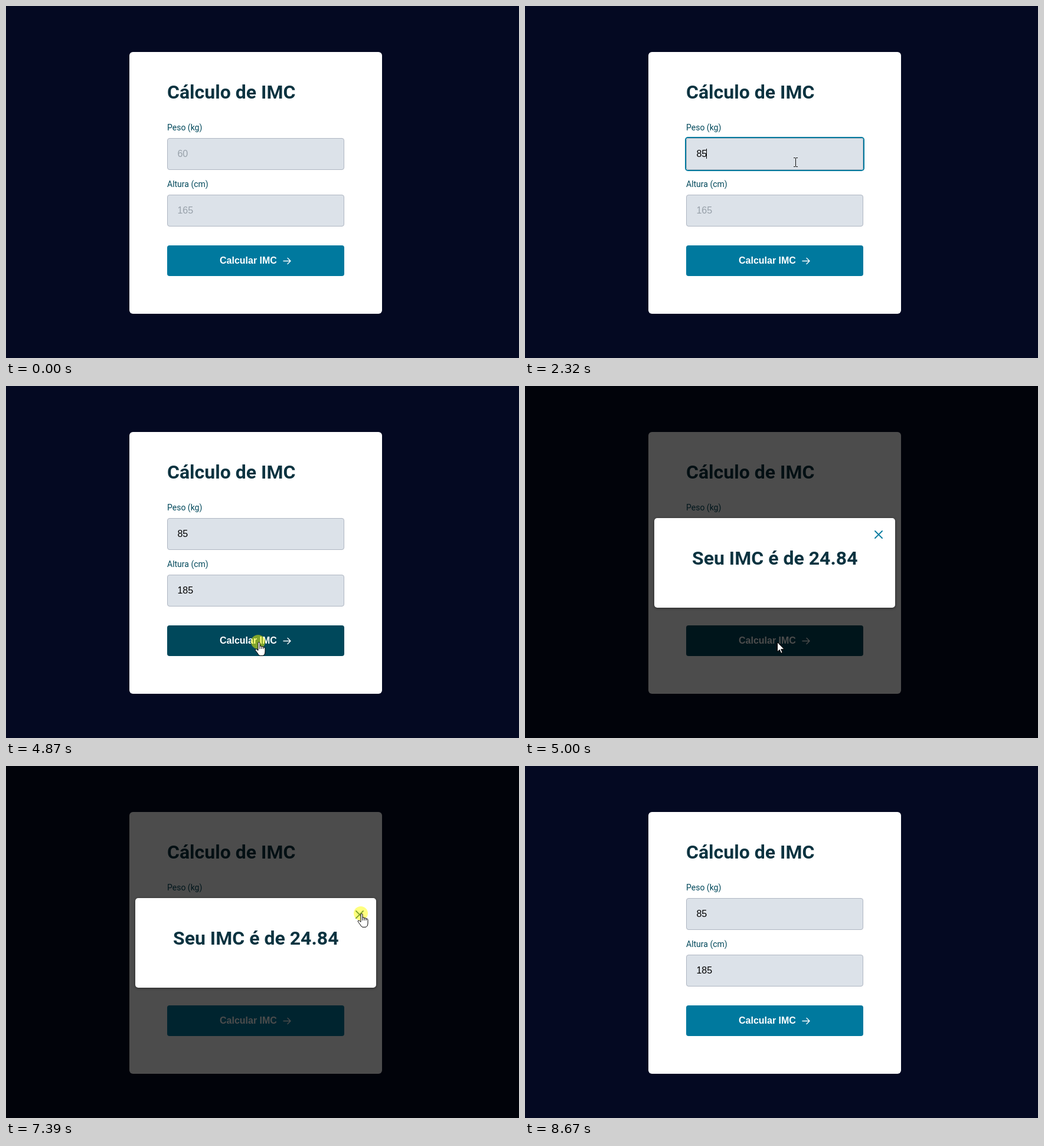
An HTML page that plays this animation: 869 by 597 pixels, repeating every 9 s.

```html
<!DOCTYPE html>
<html lang="pt-BR">
<head>
<meta charset="utf-8">
<title>Cálculo de IMC</title>
<style>
  html, body { margin: 0; height: 100%; overflow: hidden; background: #040922; }
  svg { display: block; width: 869px; height: 597px; }
  .title { font: 700 32px Roboto, sans-serif; fill: #0b3340; }
  .label { font: 400 14px Roboto, sans-serif; fill: #00485b; }
  .value { font: 400 16px "Liberation Sans", Arial, sans-serif; }
  .action { font: 700 16px "Liberation Sans", Arial, sans-serif; fill: #fff; }
  .box { fill: #dce2e9; stroke: #afb6c2; }
  .ring { fill: none; stroke: #00799e; stroke-width: 2; }
  .icon { fill: none; stroke-linecap: round; stroke-linejoin: round; }
  .dialog { fill: #fff; filter: drop-shadow(0 1px 2px rgba(0, 0, 0, .5)); }
  .pointer { fill: #fff; stroke: #000; stroke-linejoin: round; }
</style>
</head>
<body>
<svg viewBox="0 0 869 597">
  <rect width="869" height="597" fill="#040922"/>
  <rect x="209" y="78" width="428" height="444" rx="6" fill="#fff"/>
  <text class="title" x="273" y="157">Cálculo de IMC</text>
  <g id="fields"></g>

  <rect id="button" x="273" y="406" width="300" height="52" rx="4"/>
  <text class="action" x="362" y="437">Calcular IMC</text>
  <path class="icon" stroke="#fff" stroke-width="1.3" d="M470 432.5H482M477 427.5L482 432.5L477 437.5"/>

  <g id="modal">
    <rect width="869" height="597" opacity=".7"/>
    <rect class="dialog" x="219" y="224" width="408" height="152" rx="5"/>
    <text class="title" x="283" y="303">Seu IMC é de 24.84</text>
    <path id="close" class="icon" stroke-width="1.8" d="M593 246L605 258M605 246L593 258"/>
  </g>

  <g id="cursor">
    <circle id="press" r="12" fill="#ff0" opacity=".5"/>
    <path id="arrow" class="pointer" d="M.5 .5V16.8L4.2 13.3L6.8 19.3L9.2 18.3L6.7 12.4H12Z"/>
    <g id="hand" class="pointer" transform="translate(.5 0)">
      <path d="M-.5 2Q-.5 .5 1 .5Q2.5 .5 2.5 2V7Q5 6 5.5 8Q8 7 8.5 9Q11.5 8.5 11.5 11V16Q11.5 22.5 7.5 23.3H2.5Q0 22.5 -1.5 19L-5 14.5Q-6 12.5 -4.5 12Q-3 11.5 -.5 14.5Z"/>
      <path fill="none" d="M2.5 7V12M5.5 8V12M8.5 9V12"/>
    </g>
    <path id="beam" fill="none" stroke="#111" d="M-3 -7.5H0M1 -7.5H4M.5 -7V7M-3 7.5H0M1 7.5H4"/>
  </g>
</svg>

<script>
const LOOP = 9000;
const OPEN = 5000, CLOSED = 7520;
const clicks = [1140, 4870, 7390];
const home = [832, 597];

// The pointer curves from each end to the next
const moves = [
  { from: 220, to: 1050, steps: 12, bend: [737, 265], end: [458, 265] },
  { from: 3980, to: 4610, steps: 10, bend: [440, 350], end: [427, 434] },
  { from: 6140, to: 6980, steps: 13, bend: [500, 352], end: [589, 262] },
  { from: 7050, to: 7190, steps: 3, bend: [596, 257], end: [601, 250] },
  { from: 7850, to: 8670, steps: 13, bend: [710, 385], end: [830, 600] }
];
const fields = [
  { y: 224, label: 'Peso (kg)', hint: '60', value: '85', focus: 1140, blur: 2600, keys: [2050, 2320] },
  { y: 320, label: 'Altura (cm)', hint: '165', value: '185', focus: 2600, blur: 4870, keys: [3000, 3270, 3520] }
];

const $ = id => document.getElementById(id);
const within = (t, a, b) => t >= a && t < b;
const clamp = k => Math.min(1, Math.max(0, k));
const show = (el, on) => { el.style.display = on ? '' : 'none'; };

$('fields').innerHTML = fields.map(f => `
  <g transform="translate(273 ${f.y})">
    <text class="label" y="-13">${f.label}</text>
    <rect class="box" x=".5" y=".5" width="299" height="53" rx="3.5"/>
    <rect class="ring" x="-1" y="-1" width="302" height="56" rx="4"/>
    <text class="value" x="17.4" y="32"></text>
    <rect class="caret" y="18" width="1" height="17"/>
  </g>`).join('');

function position(t) {
  const i = moves.findLastIndex(m => t >= m.from);
  if (i < 0) return home;
  const { from, to, steps, bend, end } = moves[i];
  const begin = i ? moves[i - 1].end : home;
  const n = Math.floor((t - from) / (to - from) * (steps - 1) + 1e-6);
  const k = clamp((n + 1) / steps);
  const s = k * k * (3 - 2 * k);
  return [0, 1].map(a => Math.round(
    (1 - s) ** 2 * begin[a] + 2 * s * (1 - s) * bend[a] + s * s * end[a]));
}

// Colour transition that advances every 70 ms
const fade = (t, from, length) => clamp(Math.floor((t - from) / 70) * 70 / length);
const tint = k => `rgb(0 ${Math.round(121 - 49 * k)} ${Math.round(158 - 67 * k)})`;

function drawField(f, el, t) {
  const typed = f.keys.filter(k => t >= k);
  const count = typed.length;
  const text = el.querySelector('.value');
  text.textContent = count ? f.value.slice(0, count) : f.hint;
  text.setAttribute('fill', count ? '#000' : '#98a1aa');

  const active = within(t, f.focus, f.blur);
  const idle = t - Math.max(f.focus, ...typed);
  const caret = el.querySelector('.caret');
  show(el.querySelector('.ring'), active);
  show(caret, active && idle % 1000 < 500);
  caret.setAttribute('x', 17 + Math.floor(count * 8.9));
}

function pointerKind(x, y, open) {
  const inside = (left, top, w, h) => within(x, left, left + w) && within(y, top, top + h);
  if (open) return inside(587, 240, 24, 24) ? 'hand' : 'arrow';
  if (inside(273, 406, 300, 52)) return 'hand';
  return fields.some(f => inside(273, f.y, 300, 54)) ? 'beam' : 'arrow';
}

function draw(t) {
  const open = within(t, OPEN, CLOSED);
  fields.forEach((f, i) => drawField(f, $('fields').children[i], t));
  $('button').setAttribute('fill', tint(fade(t, 4400, 210) - fade(t, OPEN, 280)));
  $('close').setAttribute('stroke', tint(fade(t, 6910, 210)));
  show($('modal'), open);

  const [x, y] = position(t);
  const kind = pointerKind(x, y, open);
  $('cursor').setAttribute('transform', `translate(${x} ${y})`);
  ['arrow', 'hand', 'beam'].forEach(id => show($(id), id === kind));
  show($('press'), clicks.some(c => within(t, c, c + 110)));
}

const start = performance.now();
function frame() {
  draw((performance.now() - start) % LOOP);
  requestAnimationFrame(frame);
}
frame();
</script>
</body>
</html>
```
